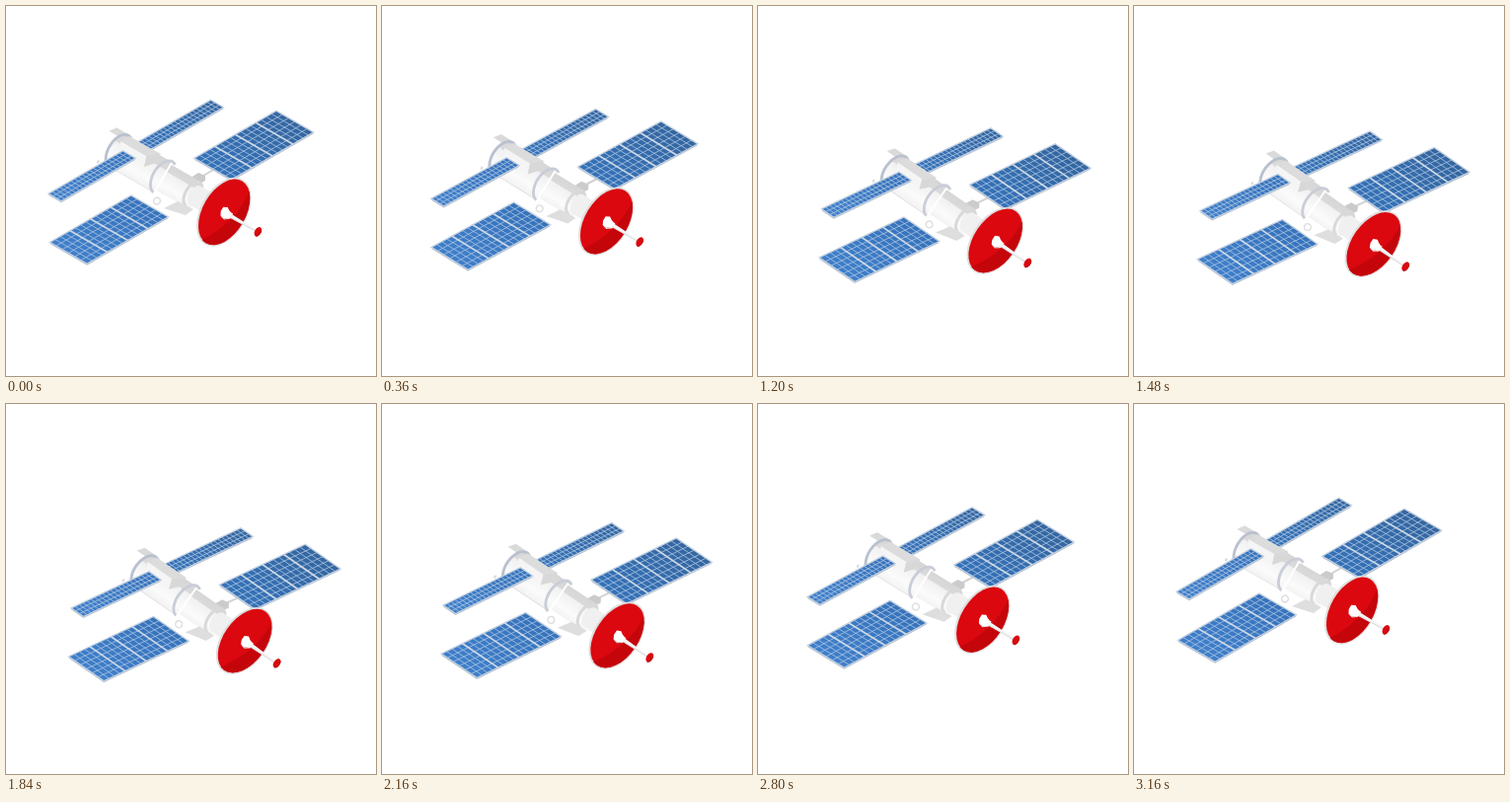
Write an HTML page that moves like this. It is 375 px wide and 375 px high and loops after 3200 ms.

```html
<!DOCTYPE html>
<html lang="en">
<head>
<meta charset="utf-8">
<title>Satellite</title>
<style>
html, body { margin: 0; width: 100%; height: 100%; overflow: hidden; background: #fff; }
svg { display: block; width: 100vw; height: 100vh; }
</style>
</head>
<body>
<svg viewBox="0 0 375 375">
  <defs>
    <linearGradient id="tube" x2="0" y2="1">
      <stop offset="0" stop-color="#d6d6d6"/>
      <stop offset=".27" stop-color="#dadada"/>
      <stop offset=".3" stop-color="#f1f1f1"/>
      <stop offset=".75" stop-color="#fbfbfb"/>
      <stop offset="1" stop-color="#f3f3f3"/>
    </linearGradient>
    <linearGradient id="shade">
      <stop offset="0" stop-color="#3572b8"/>
      <stop offset="1" stop-color="#35669f"/>
    </linearGradient>
    <linearGradient id="lit">
      <stop offset="0" stop-color="#3f7fca"/>
      <stop offset="1" stop-color="#3773bb"/>
    </linearGradient>
    <clipPath id="bowl"><ellipse rx="21.8" ry="36.4"/></clipPath>
  </defs>
  <g id="craft">
    <!-- right arm and panels behind the hull -->
    <path d="M182 182L212 165" stroke="#d2d2d2" stroke-width="2"/>
    <path d="M184 176l11-7 7 3v5l-11 6-7-2z" fill="#cbcbcb"/>
    <g id="back"></g>
    <!-- hull, with x running along its axis -->
    <g transform="translate(113.5 147) rotate(30)">
      <path d="M-18-13l5-7h14l2 7z" fill="#dadada"/>
      <path d="M-12 18v3" stroke="#d8d8d8" stroke-width="2"/>
      <path d="M0-17.5H52V17.5H0A10 17.5 0 0 1 0-17.5" fill="url(#tube)"/>
      <path d="M2 18H50" stroke="#e2e2e2"/>
      <path d="M6-17A11 19 0 1 0 0 19" fill="none" stroke="#b9c0ce" stroke-width="2.8"/>
      <path d="M54-15H88A8.7 15 0 0 1 88 15H54z" fill="url(#tube)"/>
      <path d="M57-17A10.6 18.4 0 1 0 52 18.4" fill="none" stroke="#c9cdd8" stroke-width="2.8"/>
      <path d="M88-14A8 14 0 0 0 88 14" fill="none" stroke="#d9d9d9" stroke-width="3"/>
      <path d="M90-11H104V11H90A6 11 0 0 1 90-11" fill="#f0f0f0"/>
      <path d="M104-7H116V7H104z" fill="#f8f8f8"/>
      <circle cx="59.5" cy="24" r="3.4" fill="#fff" stroke="#dedede" stroke-width="1.5"/>
    </g>
    <path d="M160 205l14-7 16 8-8 6z" fill="#dedede"/>
    <path d="M116 137l9-5 32 18-10 6z" fill="#dcdcdc"/>
    <path d="M116 137l26 15v11l-26-14z" fill="#f5f5f5"/>
    <path d="M142 153l13-4v9l-15 5z" fill="#d8d8d8"/>
    <g id="front"></g>
    <!-- dish -->
    <g transform="translate(220.8 208.7) rotate(30)">
      <ellipse rx="23.4" ry="38" fill="#dedede"/>
      <ellipse cx=".4" rx="21.8" ry="36.4" fill="#db080f"/>
      <path d="M10-40Q20 0-8 40H30V-40z" clip-path="url(#bowl)" fill="#c4060b"/>
      <path d="M-3-4l4-2 3 2 3 1 2 0v6l-3 1-3 2-4-1-2-4z" fill="#fff"/>
      <path d="M0 5l4 1 4-3" fill="none" stroke="#ddd"/>
      <path d="M8-2L38-.9V.9L8 2z" fill="#f4f4f4"/>
      <path d="M9 1.7L38 .8" stroke="#d5d5d5" stroke-width=".8"/>
      <ellipse cx="39.8" rx="3.1" ry="5.1" fill="#db080f"/>
      <path d="M40 5A3 5 0 0 0 41.5-4" fill="none" stroke="#b8050a"/>
    </g>
  </g>
</svg>
<script>
const LOOP = 3200, STEP = 40, PEAK = 1600, END = 3160;
const byId = id => document.getElementById(id);

// An isometric solar panel: u runs up-right, v runs down-right from (x, y).
function panel(x, y, w, h, cols, rows, group, fill) {
  const iso = (px, py) => `transform="matrix(.866 -.5 .866 .5 ${px} ${py})"`;
  let thin = '', wide = '';
  for (let i = 1; i < cols; i++) {
    const line = `M${w * i / cols} 0V${h}`;
    if (i % group) thin += line; else wide += line;
  }
  for (let j = 1; j < rows; j++) thin += `M0 ${h * j / rows}H${w}`;
  return `<rect ${iso(x, y + 1.5)} width="${w}" height="${h}" fill="#b4bfce"/>
    <g ${iso(x, y)} fill="none" stroke="#a9c4e4">
      <rect width="${w}" height="${h}" fill="url(#${fill})" stroke="#c3d0e0" stroke-width="1.5"/>
      <path d="${thin}" stroke-width=".75"/>
      <path d="${wide}" stroke="#ccd8e6" stroke-width="2"/>
    </g>`;
}

byId('back').innerHTML =
  panel(190.8, 154.2, 96, 43.5, 16, 6, 4, 'shade') +
  panel(133, 138.3, 86, 15, 20, 3, 99, 'shade');
byId('front').innerHTML =
  panel(43, 190.3, 87, 15, 20, 3, 99, 'lit') +
  panel(44.5, 239.5, 95, 43.5, 16, 6, 4, 'lit');

// Cubic bezier (1/6, 1/6, 2/3, 1), solved for x by bisection.
function ease(x) {
  const at = (s, p, q) => 3 * (1 - s) ** 2 * s * p + 3 * (1 - s) * s * s * q + s ** 3;
  let lo = 0, hi = 1;
  for (let i = 0; i < 24; i++) {
    const mid = (lo + hi) / 2;
    if (at(mid, 1 / 6, 2 / 3) < x) lo = mid; else hi = mid;
  }
  return at(lo, 1 / 6, 1);
}

const start = performance.now();
function draw() {
  const elapsed = Math.max(0, performance.now() - start) % LOOP;
  const t = Math.floor(elapsed / STEP) * STEP;
  const p = ease(t < PEAK ? t / PEAK : Math.max(0, (END - t) / (END - PEAK)));
  byId('craft').setAttribute('transform',
    `translate(${24 * p} ${30 * p}) rotate(${5 * p} 187.5 187.5)`);
  requestAnimationFrame(draw);
}
draw();
</script>
</body>
</html>
```
